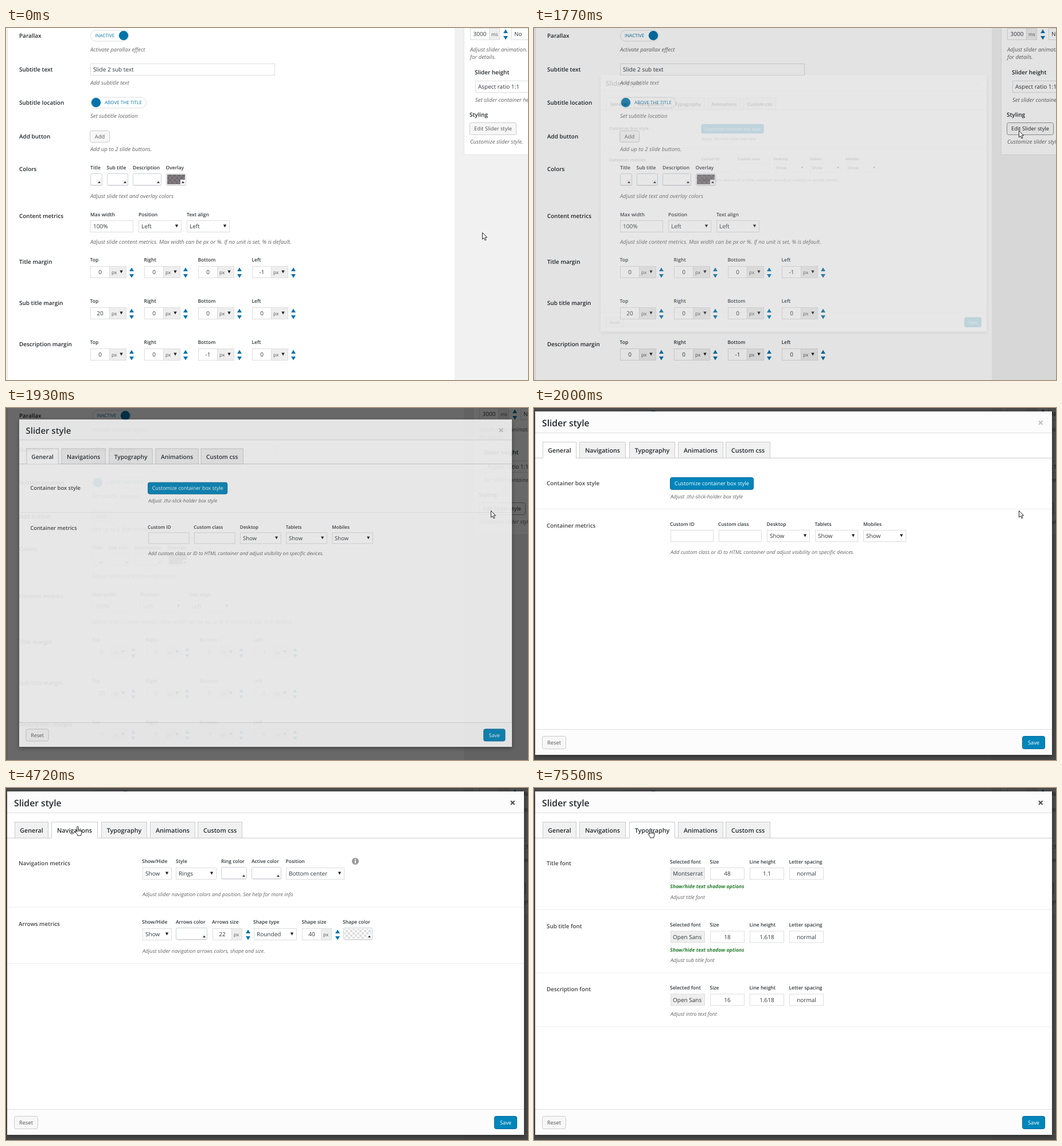
An HTML page that plays this animation: 910x615 px, repeating every 8000 ms.

```html
<!DOCTYPE html>
<html lang="en">
<head>
<meta charset="utf-8">
<title>Slider style</title>
<style>
html, body { margin: 0; width: 100%; height: 100%; overflow: hidden; background: #f1f1f1; }
svg { display: block; width: 910px; height: 615px; font-family: "Open Sans", "Noto Sans", sans-serif; text-rendering: geometricPrecision; }
</style>
</head>
<body>
<svg id="stage" viewBox="0 0 910 615"></svg>
<script>
const FONT = {
  label: [9.95, 600, '#23282d'], sub: [8.5, 600, '#32373c'], value: [10, 400, '#32373c'],
  unit: [8.3, 400, '#555'], note: [9.57, 400, '#666', 'italic'], hint: [9, 400, '#666', 'italic'],
  button: [9.3, 400, '#555'], primary: [9.3, 400, '#fff'], toggle: [8.05, 400, '#0073aa'],
  head: [15.7, 600, '#23282d'], tab: [10.7, 600, '#23282d'], row: [9.9, 600, '#444'],
  green: [8.75, 700, '#2a8030', 'italic']
};

// Text is placed by its left (or middle) x and the centre of its capitals.
function text(x, cy, str, kind, anchor = 'start') {
  const [size, weight, fill, style = 'normal'] = FONT[kind];
  return `<text x="${x}" y="${cy + size * .36}" font-size="${size}" font-weight="${weight}" fill="${fill}" font-style="${style}" text-anchor="${anchor}">${str}</text>`;
}
const rect = (x, y, w, h, fill, extra = '') =>
  `<rect x="${x}" y="${y}" width="${w}" height="${h}" fill="${fill}" ${extra}/>`;
const box = (x, y, w, h, fill = '#fff', stroke = '#ddd', r = 0) =>
  rect(x + .5, y + .5, w - 1, h - 1, fill, `stroke="${stroke}" rx="${r}"`);
const line = y => rect(2, y, 901, 1, '#eee');
const tri = (x, y, w, h, fill) => `<path d="M${x - w / 2} ${y}h${w}l${-w / 2} ${h}z" fill="${fill}"/>`;
const input = (x, y, w, str = '') => box(x, y, w, 21) + text(x + 5, y + 10.5, str, 'value');
const centred = (x, y, w, str, fill) => box(x, y, w, 21, fill) + text(x + w / 2, y + 10.5, str, 'value', 'middle');
const select = (x, y, w, str) => input(x, y, w, str) + tri(x + w - 8.5, y + 7.5, 5.4, 5, '#222');
const arrows = (x, y) => tri(x, y + 9, 8, -6.5, '#0073aa') + tri(x, y + 14, 8, 6.5, '#0073aa');
const button = (x, y, w, h, str) =>
  box(x, y, w, h, '#f7f7f7', '#ccc', 3) + text(x + w / 2, y + h / 2, str, 'button', 'middle');
const primary = (x, y, w, h, str) =>
  box(x, y, w, h, '#0085ba', '#006799', 3) + text(x + w / 2, y + h / 2, str, 'primary', 'middle');

function spinner(x, y, value, unit, unitWidth, menu) {
  return centred(x, y, 34, value) + box(x + 33, y, unitWidth, 21, '#eee') +
    text(x + 37, y + 11, unit, 'unit') + (menu ? tri(x + 54, y + 7.5, 5.4, 5, '#222') : '') +
    arrows(x + 33 + unitWidth + (menu ? 9 : 10), y);
}
function swatch(x, y, w, fill = '#fff') {
  return box(x, y + 1, w, 21, '#eee', '#e4e4e4', 2) + box(x, y, w, 21, '#fff', '#ccd0d8', 2) +
    rect(x + 2, y + 2, w - 4, 17, fill) + rect(x + w - 10, y + 11, 8, 8, '#f7f7f7') +
    tri(x + w - 5.5, y + 17, 5, -3.2, '#333');
}
function toggle(y, w, str, textX, knobX) {
  return box(147, y, w, 20, '#fff', '#ddd', 9.5) + text(textX, y + 10, str, 'toggle') +
    `<circle cx="${knobX}" cy="${y + 9.8}" r="8.2" fill="#0073aa"/>`;
}
const subs = (y, ...pairs) => pairs.map(([x, s]) => text(x, y, s, 'sub')).join('');

function checker(id, a, b) {
  return `<pattern id="${id}" width="8" height="8" patternUnits="userSpaceOnUse">` +
    rect(0, 0, 8, 8, a) + rect(0, 0, 4, 4, b) + rect(4, 4, 4, 4, b) + '</pattern>';
}

const rows = [['Parallax', 13], ['Subtitle text', 72], ['Subtitle location', 130], ['Add button', 189],
  ['Colors', 246], ['Content metrics', 328], ['Title margin', 408], ['Sub title margin', 480], ['Description margin', 552]];
const notes = [['Activate parallax effect', 38], ['Add subtitle text', 96], ['Set subtitle location', 154],
  ['Add up to 2 slide buttons.', 212], ['Adjust slide text and overlay colors', 294],
  ['Adjust slide content metrics. Max width can be px or %. If no unit is set, % is default.', 374]];
const margins = [[0, 0, 0, -1], [20, 0, 0, 0], [0, 0, -1, 0]];

function marginRow(values, i) {
  const y = 405 + i * 72;
  return values.map((v, k) => text(147 + k * 94 - .5, y, ['Top', 'Right', 'Bottom', 'Left'][k], 'sub') +
    spinner(147 + k * 94, y + 11, v, 'px', 30, true)).join('');
}

const fields =
  notes.map(([s, y]) => text(147, y, s, 'note')).join('') +
  toggle(3.5, 68, 'INACTIVE', 155, 205) + input(147, 62, 322, 'Slide 2 sub text') +
  toggle(120.5, 98, 'ABOVE THE TITLE', 172, 157) + button(146, 179, 35, 21, 'Add') +
  subs(244, [147, 'Title'], [175.5, 'Sub title'], [221, 'Description'], [278.5, 'Overlay']) +
  swatch(147, 254, 21) + swatch(176, 254, 37) + swatch(221, 254, 50) + swatch(279, 254, 35, 'url(#dark)') +
  subs(326, [147, 'Max width'], [231, 'Position'], [315, 'Text align']) +
  input(147, 336, 75, '100%') + select(231, 336, 75, 'Left') + select(315, 336, 75, 'Left') +
  margins.map(marginRow).join('');

const sidebar =
  box(798, -5, 130, 227, '#fff', '#e5e5e5') +
  spinner(809, 0, '3000', 'ms', 19) + input(881, 0, 60, 'No') +
  text(809, 37.5, 'Adjust slider animation. See help', 'note') + text(809, 50.5, 'for details.', 'note') +
  text(817, 77, 'Slider height', 'label') + select(818, 92, 150, 'Aspect ratio 1:1') +
  text(818, 126, 'Set slider container height', 'note') + text(808, 151, 'Styling', 'label') +
  `<g id="edit">${button(808, 165, 82, 22, 'Edit Slider style')}</g>` +
  text(809, 198.5, 'Customize slider style.', 'note');

const general =
  text(22, 131, 'Container box style', 'row') + primary(237, 121, 146, 22, 'Customize container box style') +
  text(238, 155, 'Adjust .thz-slick-holder box style', 'hint') + line(176) +
  text(22, 205, 'Container metrics', 'row') +
  subs(203, [237, 'Custom ID'], [321, 'Custom class'], [405.5, 'Desktop'], [489.5, 'Tablets'], [574, 'Mobiles']) +
  input(238, 213, 75) + input(322, 213, 75) + [406, 490, 574].map(x => select(x, 213, 75, 'Show')).join('') +
  text(238, 251.5, 'Add custom class or ID to HTML container and adjust visibility on specific devices.', 'hint');

const navigations =
  text(22, 131, 'Navigation metrics', 'row') +
  subs(128, [237, 'Show/Hide'], [296, 'Style'], [375, 'Ring color'], [428, 'Active color'], [487.5, 'Position']) +
  select(238, 139, 51, 'Show') + select(296, 139, 71, 'Rings') + swatch(375, 138, 45) + swatch(428, 138, 52) +
  select(488, 139, 102, 'Bottom center') +
  '<circle cx="609" cy="128" r="6" fill="#999"/><path d="M608 126.5h2v5h-2zM608 124h2v1.6h-2z" fill="#fff"/>' +
  text(238, 186, 'Adjust slider navigation colors and position. See help for more info', 'hint') + line(208) +
  text(22, 237, 'Arrows metrics', 'row') +
  subs(234, [237, 'Show/Hide'], [296, 'Arrows color'], [359, 'Arrows size'], [431, 'Shape type'], [515.5, 'Shape size'], [587, 'Shape color']) +
  select(238, 245, 51, 'Show') + swatch(296, 244, 55) + spinner(360, 245, 22, 'px', 19) +
  select(432, 245, 75, 'Rounded') + spinner(516, 245, 40, 'px', 19) + swatch(588, 244, 51, 'url(#light)') +
  text(238, 284.5, 'Adjust slider navigation arrows colors, shape and size.', 'hint') + line(306);

function fontRow(y, label, values, shadow, hint) {
  return text(22, y, label, 'row') +
    subs(y - 2.5, [237, 'Selected font'], [306.5, 'Size'], [375.5, 'Line height'], [444.5, 'Letter spacing']) +
    box(238, y + 8, 60, 21, '#eee') + text(242, y + 18.5, values[0], 'value') +
    values.slice(1).map((v, i) => centred(307 + i * 69, y + 8, 60, v)).join('') +
    (shadow ? text(237, y + 41, 'Show/hide text shadow options', 'green') : '') +
    text(238, y + (shadow ? 59.5 : 43), hint, 'hint') + line(y + (shadow ? 81 : 65));
}
const typography =
  fontRow(131, 'Title font', ['Montserrat', '48', '1.1', 'normal'], true, 'Adjust title font') +
  fontRow(241.5, 'Sub title font', ['Open Sans', '18', '1.618', 'normal'], true, 'Adjust sub title font') +
  fontRow(351.5, 'Description font', ['Open Sans', '16', '1.618', 'normal'], false, 'Adjust intro text font');

const tabs = [['General', 15, 59], ['Navigations', 79, 81], ['Typography', 166, 80], ['Animations', 251, 79], ['Custom css', 334, 78]];
const tabMarkup = tabs.map(([s, x, w]) => '<g class="tab">' + box(x, 59, w, 29, '#f1f1f1', '#ccc') +
  rect(x + 1, 87, w - 2, 1, '#fff') + text(x + w / 2, 74, s, 'tab', 'middle') + '</g>').join('');

const modal =
  rect(2, 6, 901, 600, '#fff', 'filter="url(#shadow)"') +
  rect(2, 6, 901, 37, '#fcfcfc') + rect(2, 43, 901, 1, '#ddd') + text(14, 26, 'Slider style', 'head') +
  '<path id="close" d="M880 22.5l6.5 6.5M886.5 22.5l-6.5 6.5" stroke-width="2.3"/>' +
  rect(2, 87, 901, 1, '#ccc') + tabMarkup +
  [general, navigations, typography].map(p => `<g class="panel">${p}</g>`).join('') +
  rect(2, 561, 901, 45, '#fcfcfc') + rect(2, 561, 901, 1, '#ddd') +
  button(14, 573, 42, 23, 'Reset') + primary(851, 573, 40, 23, 'Save');

const stage = document.getElementById('stage');
stage.innerHTML = '<defs>' + checker('dark', '#716b70', '#837d82') + checker('light', '#fff', '#ddd') +
  '<filter id="shadow" x="-10%" y="-10%" width="120%" height="120%"><feDropShadow dx="0" dy="3" stdDeviation="4" flood-opacity=".4"/></filter></defs>' +
  rect(0, 0, 910, 615, '#f1f1f1') + rect(2, 0, 780, 615, '#fff', 'id="main"') + rect(2, 0, 1, 615, '#e5e5e5') +
  rows.map(([s, y]) => text(23, y, s, 'label')).join('') +
  `<g id="fields">${fields}</g><g id="side">${sidebar}</g>` + rect(0, 0, 910, 615, '#000', 'id="shade"') +
  `<g id="modal">${modal}</g>` +
  '<g stroke="#111" stroke-width=".9" stroke-linejoin="round" fill="#fff">' +
  '<path id="arrow" d="M.5 .5v11.6l2.7-2.5 1.9 4.3 1.9-.8-1.9-4.2h3.6z"/>' +
  '<path id="hand" d="M-1.2 8.5V1.3a1.2 1.2 0 0 1 2.4 0V6q2-.7 2.2.5 1.8-.5 2 .6 1.6-.3 1.6 1v3q0 2-1.2 3.1v1.8H-.4V14.4L-3.8 10q-.8-1.5.4-1.9 1 0 2.2 1.6zM1.2 6v3M3.4 6.8v2.4M5.4 7.5v2"/></g>';

const $ = id => document.getElementById(id);
const panels = [...document.querySelectorAll('.panel')];
const tabNodes = [...document.querySelectorAll('.tab')];
const set = (node, attrs) => Object.entries(attrs).forEach(([k, v]) => node.setAttribute(k, v));
const show = (node, on) => node.setAttribute('display', on ? 'inline' : 'none');
function ease(t, from, to) {
  const p = Math.min(1, Math.max(0, (t - from) / (to - from)));
  return p * p * (3 - 2 * p);
}

// Pointer moves: start, end, then quadratic curve points.
const moves = [
  [0, 769, [830, 357], [826, 262], [845, 179]],
  [2000, 3150, [845, 179], [660, 517], [170, 191]],
  [3740, 4150, [170, 191], [150, 120], [125, 67]],
  [5600, 6150, [125, 67], [165, 72], [203, 71]]
];
function pointer(t) {
  const [from, to, a, b, c] = moves.filter(m => t >= m[0]).pop();
  const p = ease(t, from, to), q = 1 - p;
  return [0, 1].map(i => q * q * a[i] + 2 * p * q * b[i] + p * p * c[i]);
}

// Motion advances in steps, like a screen recording.
const STEP = 1000 / 13;

function draw(t) {
  const held = Math.floor(t / STEP) * STEP;
  const open = ease(held, 22 * STEP, 26 * STEP), shifted = open > 0;
  const [x, y] = pointer(held);

  $('main').setAttribute('width', shifted ? 796 : 780);
  $('fields').setAttribute('transform', `translate(${shifted ? 3 : 0})`);
  $('side').setAttribute('transform', `translate(${shifted ? 16 : 0})`);
  const hover = held >= 690, pressed = t >= 1470 && !shifted;
  const [face, caption] = $('edit').children;
  set(face, { fill: pressed ? '#eee' : hover ? '#fafafa' : '#f7f7f7', stroke: hover ? '#999' : '#ccc' });
  set(caption, { fill: hover ? '#23282d' : '#555', transform: `translate(0 ${pressed ? 1 : 0})` });

  $('shade').setAttribute('opacity', .7 * open);
  set($('modal'), { opacity: open, transform: `translate(452.5 306) scale(${.7 + .3 * open}) translate(-452.5 -306)` });
  show($('modal'), shifted);
  const grey = Math.round(195 - 110 * ease(held, 2050, 2460));
  set($('close'), { stroke: `rgb(${grey},${grey},${grey})`, opacity: open });

  const active = t >= 7470 ? 2 : t >= 4490 ? 1 : 0;
  panels.forEach((panel, i) => show(panel, i === active));
  const over = t > 3800 && y < 88 ? tabs.findIndex(([, left, w]) => x >= left && x <= left + w) : -1;
  tabNodes.forEach((node, i) => {
    const [back, gap, label] = node.children;
    back.setAttribute('fill', i === active || i === over ? '#fff' : '#f1f1f1');
    show(gap, i === active);
    label.setAttribute('fill', i === over && i !== active ? '#444' : '#23282d');
  });

  show($('arrow'), over < 0);
  show($('hand'), over >= 0);
  const at = `translate(${x} ${y})`;
  $('arrow').setAttribute('transform', at);
  $('hand').setAttribute('transform', at);
}

function frame() {
  draw(performance.now() % 8000);
  requestAnimationFrame(frame);
}
frame();
</script>
</body>
</html>
```
